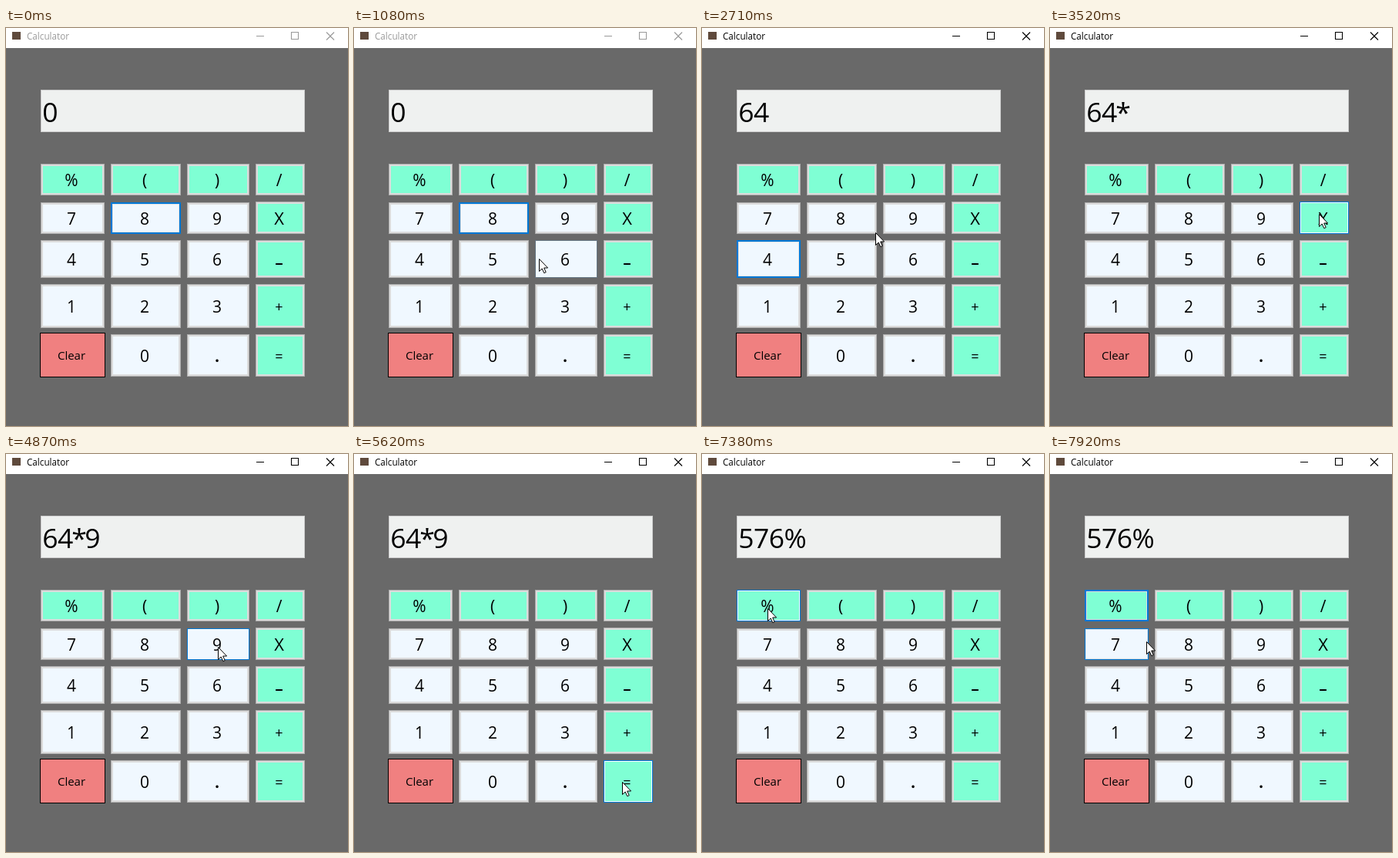
An HTML page for the animation above (7990 ms loop, 444 by 516 pixels).

```html
<!DOCTYPE html>
<html lang="en">
<head>
<meta charset="utf-8">
<title>Calculator</title>
<style>
html, body { margin: 0; width: 100%; height: 100%; overflow: hidden; background: #696969; }
div { position: absolute; box-sizing: border-box; }
#bar { left: 0; top: 0; width: 100%; height: 26px; background: #fff; }
#screen { left: 45px; top: 80px; width: 343px; height: 55px; background: #eff1f0; border: 1px solid #ccc; }
.key { background: #f0f8ff; border: 1px solid #adadad; box-shadow: inset 0 0 0 2px #dcdcdc; }
.op { background: #7fffd4; }
.clear { background: #f08080; border-color: #000; box-shadow: none; }
.focus { border: 2px solid #0078d7; box-shadow: inset 0 0 0 1px #e1e1e1; }
.hover { border: 1px solid #667684; box-shadow: none; }
.fresh { border-color: #0078d7; box-shadow: inset 0 0 0 1px #e1e1e1; }
.focus.hover { border-color: #0078d7; box-shadow: inset 0 0 0 1px #fff; }
svg { position: absolute; left: 0; top: 0; }
text { font-family: "Open Sans", "Noto Sans", sans-serif; font-size: 21px; text-anchor: middle; }
#title { font-size: 11.7px; text-anchor: start; }
#value { font-size: 35.5px; text-anchor: start; letter-spacing: -.6px; }
</style>
</head>
<body>
<div id="bar"></div>
<div id="screen"></div>
<svg id="art" width="444" height="516" viewBox="0 0 444 516">
  <rect x="8" y="5" width="11" height="10" fill="#5f4a3c"/>
  <text id="title" x="27" y="15">Calculator</text>
  <path id="controls" fill="none" stroke-width="1.1" d="M325 10.5H335M370.5 5.5H379.5V14.5H370.5ZM416 5.5L426 15.5M426 5.5L416 15.5"/>
  <text id="value" x="47.3" y="122"></text>
  <path id="cursor" d="M.5 .5V16.5L4.2 13 6.8 18.7 9.2 17.6 6.7 12H11.6Z" fill="#fff" stroke="#000"/>
</svg>
<script>
const LOOP = 7990, STEP = 70;
const cols = [[45, 83], [136, 91], [235, 81], [324, 64]];
const rows = [[176, 41], [226, 41], [275, 49], [332, 57], [397, 55]];
const labels = ["%()/", "789X", "456-", "123+", "C0.="];
const looks = {
  C: { text: "Clear", size: 15, dy: -3 },
  "-": { text: "–", dy: 4, weight: 600 },
  ".": { size: 24, weight: 600 },
  "+": { size: 18, dy: -1 },
  "=": { size: 18, dy: -1 },
  X: { size: 22 }
};

// begin, end, and where the pointer arrives
const legs = [
  [590, 590, 335, 471], [590, 1080, 240, 299], [1080, 1200, 222, 295], [1200, 1360, 262, 303],
  [1560, 2110, 89, 292], [2440, 3120, 349, 241], [3520, 3800, 275, 250], [4870, 5550, 348, 425],
  [6420, 6490, 399, 345], [6490, 6760, 225, 243], [6760, 7180, 85, 200], [7710, 7920, 125, 243]
];
// press, display update, key, display
const clicks = [
  [0, 0, "8", "0"], [1490, 1490, "6", "6"], [2370, 2370, "4", "64"], [3190, 3260, "X", "64*"],
  [4200, 4270, "9", "64*9"], [5550, 5890, "=", "576"], [7250, 7250, "%", "576%"]
];

const $ = id => document.getElementById(id);
const keys = [];

function addLabel(id, x, y) {
  const { text = id, size = 21, dy = 0, weight = 400 } = looks[id] || {};
  const el = document.createElementNS("http://www.w3.org/2000/svg", "text");
  el.textContent = text;
  el.setAttribute("x", x);
  el.setAttribute("y", y + dy);
  el.style.fontSize = size + "px";
  el.style.fontWeight = weight;
  $("art").insertBefore(el, $("cursor"));
}

rows.forEach(([top, height], r) => cols.forEach(([left, width], c) => {
  const id = labels[r][c];
  let [x, y, w, h] = [left, top, width, height];
  if (id === "X") { y--; h++; }
  if (id === "C") { x--; y -= 2; w += 2; h += 3; }
  const el = document.createElement("div");
  const kind = "key" + (id === "C" ? " clear" : r === 0 || c === 3 ? " op" : "");
  el.style.cssText = `left:${x}px;top:${y}px;width:${w}px;height:${h}px`;
  document.body.insertBefore(el, $("art"));
  keys.push({ id, x, y, w, h, el, kind });
  addLabel(id, left + width / 2 - 1.5, top + height / 2 + 8.5);
}));

const last = (list, t, column) => list.filter(item => item[column] <= t).pop();

function tip(t) {
  const leg = last(legs, t, 0);
  if (!leg) return null;
  const [begin, end, x, y] = leg;
  const [, , x0, y0] = legs[legs.indexOf(leg) - 1] || leg;
  if (t >= end) return [x, y];
  const k = Math.floor((t - begin) / STEP) * STEP / (end - begin);
  const ease = k * (2 - k);
  return [Math.round(x0 + (x - x0) * ease), Math.round(y0 + (y - y0) * ease)];
}

function hit(t) {
  const p = tip(t);
  return p && keys.find(k => p[0] >= k.x && p[0] < k.x + k.w && p[1] >= k.y && p[1] < k.y + k.h);
}

function draw(t) {
  const focus = last(clicks, t, 0)[2], value = last(clicks, t, 1)[3];
  const under = hit(t);
  const hover = under === hit(t - STEP) ? under : null;
  const fresh = hover !== hit(t - 2 * STEP);
  for (const k of keys) {
    let name = k.kind;
    if (k.id === focus) name += " focus";
    if (k === hover && k.id !== "C") name += fresh ? " hover fresh" : " hover";
    k.el.className = name;
  }
  $("value").textContent = value;
  // narrow the wide asterisk
  $("value").setAttribute("dx", value.includes("*") ? "0 0 -1.5 -2" : "0");
  const ink = t < clicks[1][0] ? "#999" : "#000";
  $("title").setAttribute("fill", ink);
  $("controls").setAttribute("stroke", ink);
  const p = tip(t);
  $("cursor").setAttribute("visibility", p ? "visible" : "hidden");
  if (p) $("cursor").setAttribute("transform", `translate(${p})`);
}

const start = performance.now();
function tick() {
  draw((performance.now() - start) % LOOP);
  requestAnimationFrame(tick);
}
tick();
</script>
</body>
</html>
```
